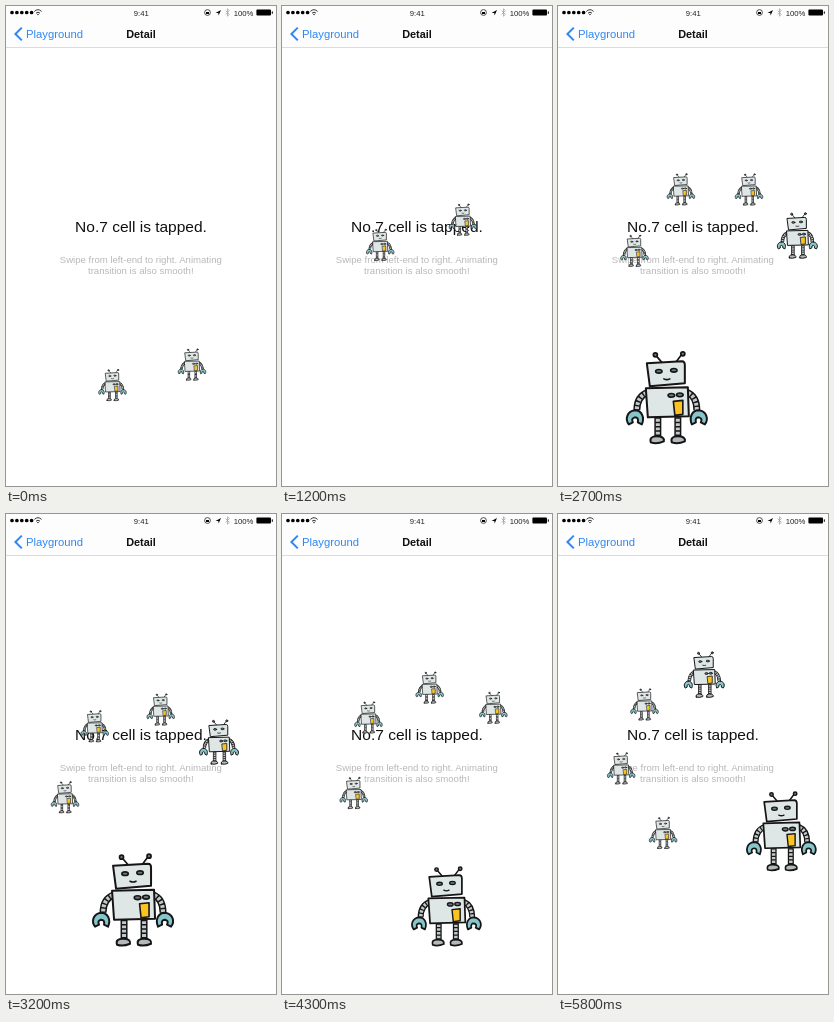
Write an HTML page that moves like this. It is 270 by 480 pixels and loops after 5900 ms.

```html
<!DOCTYPE html>
<html lang="en">
<head>
<meta charset="utf-8">
<title>Touch robots</title>
<style>
  html, body { margin: 0; width: 100%; height: 100%; overflow: hidden; background: #fff; }
  svg { display: block; width: 100vw; height: 100vh; }
  text { font-family: "Liberation Sans", Arial, sans-serif; }
  .mid { text-anchor: middle; }
</style>
</head>
<body>
<svg viewBox="0 0 270 480">
  <defs>
    <path id="limbs" d="M-19-5Q-30-1-30 13M20-5Q30-1 30 13M-9 20V39M11 20V39"/>
    <path id="claw" d="M-32 13C-40 14-42 22-38 27L-34 25Q-36 21-32 20Q-28 20-29 25L-25 27C-22 20-25 13-32 13Z"/>
    <path id="foot" d="M-6 45Q-8 39 0 39Q8 39 7 44Q0 47-6 45Z"/>
    <g id="robot" stroke="#151515" stroke-width="2" stroke-linecap="round" stroke-linejoin="round" fill="#dfe6e6">
      <!-- limbs: dark tube, pale core, dark rings -->
      <g fill="none" stroke-linecap="butt">
        <use href="#limbs" stroke-width="7"/>
        <use href="#limbs" stroke-width="4" stroke="#c3c9ca"/>
        <use href="#limbs" stroke-width="5" stroke-dasharray="1.5 2.8"/>
      </g>
      <g fill="#86c5c9">
        <use href="#claw"/>
        <use href="#claw" transform="scale(-1 1)"/>
      </g>
      <g fill="#b4babc">
        <use href="#foot" x="-10"/>
        <use href="#foot" x="11"/>
      </g>
      <g stroke-width="1.7" fill="#777">
        <path d="M-11-42L-5-35M15-43L9-35"/>
        <circle cx="-11.5" cy="-42.5" r="2"/>
        <circle cx="16" cy="-43.5" r="2"/>
      </g>
      <path d="M-20-34L15-36Q18-36 18-32L18-14L-17-11Z"/>
      <path d="M-21-9L21-10L22 19L-19 20Z"/>
      <g fill="#68787f" stroke-width="1.6">
        <ellipse cx="-8" cy="-26" rx="3.2" ry="1.8"/>
        <ellipse cx="7" cy="-27" rx="3.2" ry="1.8"/>
        <ellipse cx="4.5" cy="-2" rx="3.3" ry="1.9"/>
        <ellipse cx="13" cy="-2.5" rx="3.3" ry="1.9"/>
      </g>
      <path fill="none" stroke-width="1.6" d="M-3-18.5Q0-17 3-18.5"/>
      <path fill="#fac321" stroke-width="1.6" d="M6.5 4L16 3V17L8 18Z"/>
    </g>
  </defs>

  <rect width="270" height="480" fill="#fff"/>
  <rect width="270" height="41" fill="#fdfdfd"/>
  <path d="M0 41.5H270" stroke="#dcdcdc"/>

  <!-- status bar -->
  <path d="M6 6.5H26" stroke="#000" stroke-width="3.7" stroke-linecap="round" stroke-dasharray="0 4.9"/>
  <g fill="none" stroke="#222" stroke-width=".9">
    <path d="M28.4 5.4Q32 2 35.6 5.4M30 7.2Q32 5.2 34 7.2"/>
    <circle cx="32" cy="8.5" r=".4"/>
    <circle cx="201.5" cy="6.5" r="2.9" stroke-width=".8"/>
  </g>
  <path d="M200 6H203V8H200ZM209.5 7L215 4L212.6 9.5L212.3 7Z"/>
  <path d="M219.6 4.6L223.4 8.4L221.5 10.2V2.8L223.4 4.6L219.6 8.4" fill="none" stroke="#999" stroke-width=".7"/>
  <g font-size="7.7" fill="#222">
    <text class="mid" x="135.3" y="9.5">9:41</text>
    <text x="227.7" y="9.5">100%</text>
  </g>
  <rect x="250.4" y="3.6" width="14.6" height="6" rx="1"/>
  <path d="M266.3 5.4V7.8" stroke="#000"/>

  <!-- navigation bar and page -->
  <path d="M15.8 21.6L9.4 28L15.8 34.4" fill="none" stroke="#2f87f2" stroke-width="2"/>
  <text x="20" y="31.7" font-size="11.3" fill="#2f87f2">Playground</text>
  <text class="mid" x="135" y="31.7" font-size="10.9" font-weight="bold" fill="#111">Detail</text>
  <text class="mid" x="135" y="226.3" font-size="15.5" fill="#111">No.7 cell is tapped.</text>
  <g class="mid" font-size="9.6" fill="#b8b8b8">
    <text x="134.8" y="257.2">Swipe from left-end to right. Animating</text>
    <text x="134.8" y="268.2">transition is also smooth!</text>
  </g>
  <g id="touches"></g>
</svg>
<script>
const LOOP = 5900, STEP = 100, SMALL = 0.345, FIRM = 0.5;

// Two fingers dragged upwards.
const drag = { duration: 2000, lift: 2100, paths: [
  { from: [186, 358.5], to: [179, 158] },
  { from: [106.5, 379], to: [95, 185] },
] };

// A rigid hand: direction in degrees and distance from the palm.
const fingers = [
  { angle: -13, reach: 84 },
  { angle: -65, reach: 43 },
  { angle: -168, reach: 44 },
  { angle: 131, reach: 88 },
];
const THUMB_ANGLE = 79, THUMB_DELAY = 200;

// The hand turns twice; the palm follows a curve while the thumb pulls in.
const turns = [
  { start: 2500, duration: 1300, lift: 3900, turn: [35, 7], thumbReach: [200, 118], thumbSize: 1,
    indexSize: [FIRM, SMALL], palm: [[176, 196], [109.5, 249], [128, 222]] },
  { start: 4300, duration: 1500, lift: LOOP, turn: [0, -44], thumbReach: [183, 150], thumbSize: 0.86,
    indexSize: [SMALL, FIRM], palm: [[129.5, 212.5], [69, 222], [100.5, 231]] },
];

const mix = (a, b, u) => a + (b - a) * u;
const easeOut = (u, power) => 1 - (1 - u) ** power;
const progress = (t, start, duration) => Math.min(Math.max((t - start) / duration, 0), 1);

function bezier([a, b, c], u) {
  return [0, 1].map(i => mix(mix(a[i], b[i], u), mix(b[i], c[i], u), u));
}

function polar([x, y], degrees, reach, size) {
  const angle = degrees * Math.PI / 180;
  return { x: x + reach * Math.cos(angle), y: y + reach * Math.sin(angle), size };
}

function dragTouches(t) {
  const u = easeOut(progress(t, 0, drag.duration), 1.4);
  return drag.paths.map(({ from, to }) => (
    { x: mix(from[0], to[0], u), y: mix(from[1], to[1], u), size: SMALL }
  ));
}

function handTouches(hand, t) {
  const u = progress(t, hand.start, hand.duration);
  const palm = bezier(hand.palm, u);
  const turn = mix(...hand.turn, easeOut(u, 2.3));
  const indexSize = mix(...hand.indexSize, u ** 4);
  const touches = fingers.map(({ angle, reach }, i) =>
    polar(palm, angle + turn, reach, i === 0 ? indexSize : SMALL));
  if (t >= hand.start) {
    touches.push(polar(palm, THUMB_ANGLE + turn, mix(...hand.thumbReach, u), hand.thumbSize));
  }
  return touches;
}

function touchesAt(t) {
  if (t < drag.lift) return dragTouches(t);
  const hand = turns.find(({ start, lift }) => t >= start - THUMB_DELAY && t < lift);
  return hand ? handTouches(hand, t) : [];
}

const layer = document.getElementById("touches");
const robots = Array.from({ length: fingers.length + 1 }, () => {
  const robot = document.createElementNS("http://www.w3.org/2000/svg", "use");
  robot.setAttribute("href", "#robot");
  return layer.appendChild(robot);
});

function render(t) {
  const touches = touchesAt(t);
  robots.forEach((robot, i) => {
    const touch = touches[i];
    robot.style.display = touch ? "" : "none";
    if (touch) robot.setAttribute("transform", `translate(${touch.x} ${touch.y}) scale(${touch.size})`);
  });
}

const start = performance.now();
function tick() {
  const t = (performance.now() - start) % LOOP;
  render(Math.floor(t / STEP) * STEP);
  requestAnimationFrame(tick);
}
render(0);
requestAnimationFrame(tick);
</script>
</body>
</html>
```
